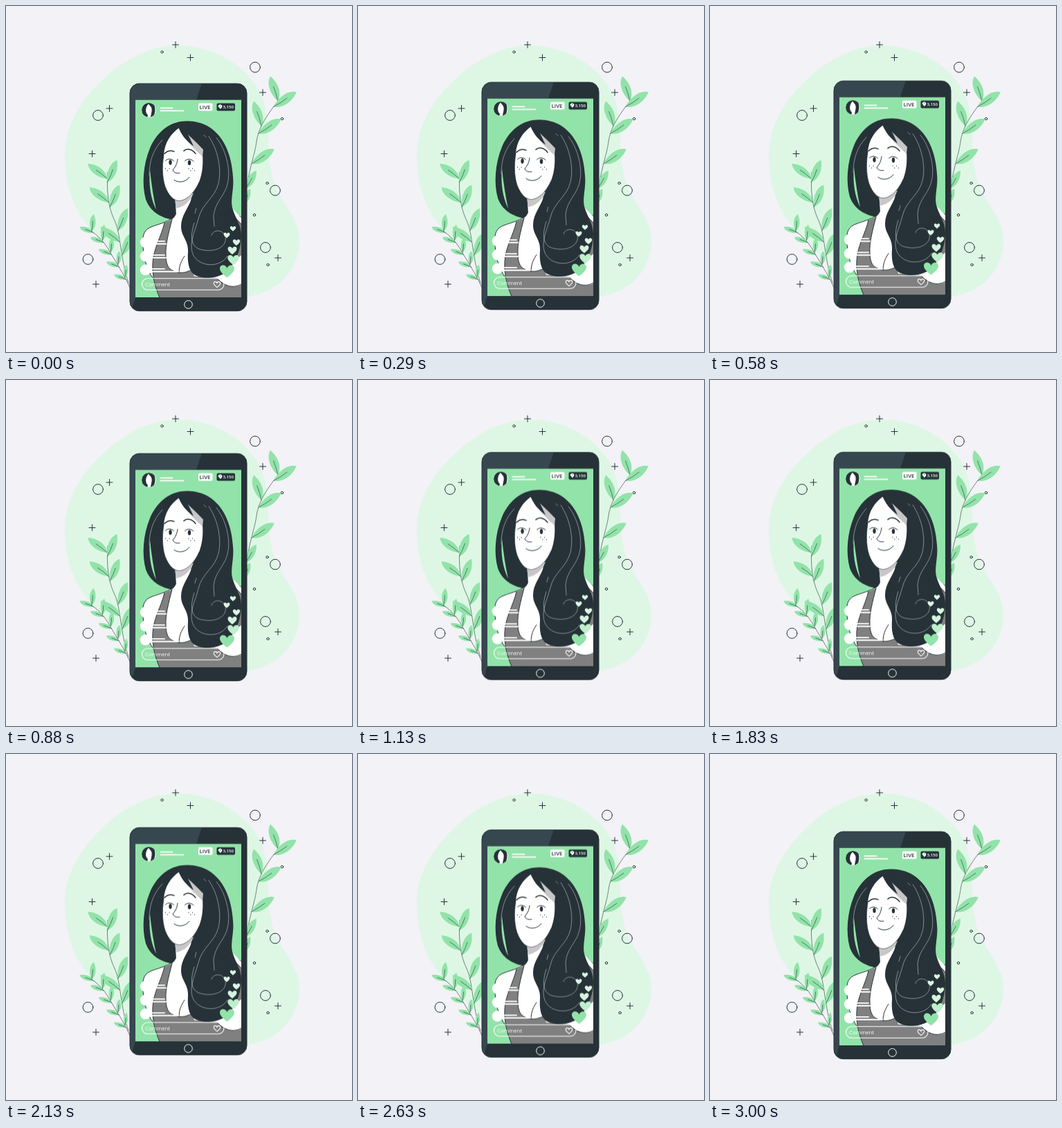
An HTML page for the animation above (3040 ms loop, 500 by 500 pixels).

```html
<!DOCTYPE html>
<html lang="en">
<head>
<meta charset="utf-8">
<title>Live stream</title>
<style>
  html, body { margin: 0; width: 100%; height: 100%; overflow: hidden; background: #f2f2f7; }
  svg { display: block; width: 100vw; height: 100vh; }
  text { font-family: "Open Sans", "Noto Sans", sans-serif; }
  .ink { fill: none; stroke: #263238; stroke-width: 1; stroke-linecap: round; stroke-linejoin: round; }
  .thin { stroke-width: .6; }
  .bold { stroke-width: 1.5; }
  .strand { fill: none; stroke: #b9c0c3; stroke-width: .65; stroke-linecap: round; }
  .line { fill: none; stroke: #fff; stroke-width: 1.9; stroke-linecap: round; }
  .dark { fill: #263238; }
  .green { fill: #92e3a9; }
  .white { fill: #fff; }
  .shade { fill: #c7c7c7; }
  .cloth { fill: #808080; }
  #phone { animation: float 3040ms linear infinite; }
  /* 1.5 s up, 1.5 s down, then a 40 ms rest */
  @keyframes float {
    0%, 98.684%, 100% { transform: translateY(.4px); }
    49.342% { transform: translateY(-9.6px); }
  }
</style>
</head>
<body>
<svg viewBox="0 0 500 500">
  <defs>
    <clipPath id="screen"><rect x="187" y="135" width="153" height="285.5"/></clipPath>
    <clipPath id="body"><rect x="179" y="111.5" width="169" height="329" rx="14"/></clipPath>
    <clipPath id="avatar"><circle cx="206.5" cy="150" r="10.5"/></clipPath>
    <path id="heart" d="M0 .42C-.2 .25-.5 .02-.5-.2C-.5-.5-.12-.52 0-.24C.12-.52 .5-.5 .5-.2C.5 .02 .2 .25 0 .42Z"/>
    <path id="plus" d="M-4.5 0h9M0-4.5v9"/>
    <circle id="ring" r="7.4"/>
    <circle id="bead" r="1.7"/>
  </defs>

  <path fill="#def7e5" d="M250 57C301 58 345 85 366 123C384 160 376 205 383 238C388 280 424 299 424 340C424 382 390 419 338 421C278 424 222 414 187 385C162 365 137 340 117 316C96 290 85 255 85 216C85 178 103 143 134 112C168 78 207 57 250 57Z"/>

  <g class="ink">
    <use href="#plus" x="245" y="56"/>
    <use href="#plus" x="266.500" y="74.500"/>
    <use href="#plus" x="149.500" y="148"/>
    <use href="#plus" x="124.500" y="213.500"/>
    <use href="#plus" x="371" y="125"/>
    <use href="#plus" x="393" y="364"/>
    <use href="#plus" x="130" y="402"/>
    <use href="#ring" x="133" y="158"/>
    <use href="#ring" x="360" y="88.500"/>
    <use href="#ring" x="389" y="266.500"/>
    <use href="#ring" x="375" y="349"/>
    <use href="#ring" x="118.500" y="366"/>
    <use href="#bead" x="225.500" y="66.500"/>
    <use href="#bead" x="399" y="163"/>
    <use href="#bead" x="377.500" y="256"/>
    <use href="#bead" x="359" y="302"/>
    <use href="#bead" x="378.500" y="374"/>
  </g>
  <g id="plants"></g>

  <g id="phone">
    <g clip-path="url(#body)">
      <rect class="dark" x="179" y="111" width="169" height="331"/>
      <path fill="#37474f" d="M179 111H283L275 135H187V420.5L181 441H179Z"/>
    </g>
    <rect class="ink" x="179" y="111.5" width="169" height="329" rx="14"/>
    <circle cx="263.5" cy="431" r="5.8" fill="none" stroke="#fff"/>

    <g clip-path="url(#screen)">
      <rect class="green" x="187" y="135" width="153" height="286"/>

      <!-- shoulders, arm and top -->
      <path class="white" d="M245 276L246 298C244 309 226 313 212 318C200 322 197 330 198 342C198 362 203 380 213 394L222 421H340V395L262 330L268 270Z"/>
      <path class="ink" d="M246 298C244 309 226 313 212 318C200 322 197 330 198 342C198 362 203 380 213 394"/>
      <path class="cloth" d="M229 313L240 308C235 328 230 345 231 360C231 371 234 378 239 381C249 387 260 386 269 380L272 390L340 395V421H222C216 407 211 391 212 371C213 350 224 334 229 313Z"/>
      <path class="ink" d="M229 313C224 334 213 350 212 371C211 391 216 407 222 421M240 308C235 328 230 345 231 360C231 371 234 378 239 381C249 387 260 386 269 380M250 385C250 376 253 368 258 361"/>
      <path class="cloth" d="M328 303H341V366L328 374Z"/>
      <path class="white" d="M328 293L341 307V316L330 304Z"/>
      <path class="white" d="M303 389C312 385 321 376 329 368L341 359V402C332 407 321 406 314 400C309 397 305 394 303 389Z"/>
      <path class="ink" d="M306 394C315 404 329 409 341 401M330 304L341 316"/>

      <!-- hair -->
      <path class="dark" d="M258 166C234 167 217 184 208 205C198 229 196 258 202 279C208 296 223 305 239 308C245 305 246 300 246 292L268 278C264 291 253 302 253 318C253 333 264 338 263 355C262 370 264 386 277 390C292 395 313 392 323 379C334 366 340 348 340 331C340 315 331 306 327 291C324 278 330 263 328 246C326 213 314 187 293 174C283 168 270 165 258 166Z"/>
      <path class="green" d="M208 236C206 258 209 278 217 294C213 276 210 256 208 236Z"/>

      <!-- neck and face -->
      <path class="white" d="M244 272L246 300C254 297 264 288 269 274Z"/>
      <path class="shade" d="M244 275L245.5 292C256 290 265 284 271 270Z"/>
      <path class="white" d="M251 175C238 184 229 197 228 215C225 233 226 253 232 265C237 276 245 282 252 281C263 279 273 268 279 254C284 241 285 228 284 214C274 200 261 188 251 175Z"/>
      <path class="shade" d="M251 175C258 192 269 204 284 217L285 207C274 195 262 184 251 175Z"/>
      <path class="dark" d="M248 172C253 186 261 195 271 202C266 190 260 182 259 172Z"/>
      <path class="ink thin" d="M228 215C225 233 226 253 232 265C237 276 245 282 252 281C263 279 273 268 279 254"/>
      <path class="ink bold" d="M229 213C233 209 238 208 243 210M257 209C261 205 269 206 274 213"/>
      <path class="ink" d="M230.5 223C234 219.5 239 220 242.5 223.5M258.5 223.5C262 220 267 220 271 224M248 221C247 227 246 231 241 236.5C242 240 246 242 251 241M243 251C250 256 260 254 265 247"/>
      <ellipse class="dark" cx="237.5" cy="225.500" rx="2.200" ry="3.600"/>
      <ellipse class="dark" cx="265" cy="226" rx="2.200" ry="3.600"/>
      <g id="freckles" class="dark"></g>

      <path class="strand" d="M226 193C212 208 207 225 207 244"/>
      <path class="strand" d="M293 188C306 207 312 235 307 256C302 277 283 285 278 307C273 326 264 342 270 358C278 377 309 379 320 361"/>
      <path class="strand" d="M304 190C318 207 324 235 321 252C318 274 302 281 300 303L301 318"/>
      <path class="strand" d="M275 292L273 299M272 313C264 338 270 350 284 352C303 356 320 347 317 333C314 322 299 322 297 331M286 186L289 189"/>

      <!-- stream header -->
      <g clip-path="url(#avatar)">
        <circle class="dark" cx="206.5" cy="150" r="10.500"/>
        <path class="white" d="M213 139C217 148 216 156 211 162H219V139ZM206 141C201 146 201 154 205 157L204 161H209C209 156 212 151 210 146Z"/>
      </g>
      <path class="line" d="M223.5 147H240.5M223.5 151H256.5"/>
      <rect class="white" x="278" y="140" width="20.500" height="11" rx="1.500"/>
      <text x="279.600" y="148.300" font-size="7.800" font-weight="600" fill="#263238">LIVE</text>
      <rect class="dark" x="304.500" y="140" width="26.500" height="11" rx="2"/>
      <path class="white" d="M306.5 144C308 141.500 311 141.500 312.500 144C312 147 310 148.500 309 148C309 146 307 146 306.500 144Z"/>
      <circle class="dark" cx="309.500" cy="144.200" r=".7"/>
      <text x="313.500" y="147.600" font-size="6.100" font-weight="600" fill="#fff">3,150</text>

      <!-- comments and reactions -->
      <g id="comments"></g>
      <rect x="196.500" y="393.300" width="118.500" height="16.500" rx="8.250" fill="none" stroke="#fff" stroke-width="1.100"/>
      <text x="201" y="404.300" font-size="7.800" fill="#fff">Comment</text>
      <use href="#heart" transform="translate(305 402.200) scale(9.500)" fill="none" stroke="#fff" stroke-width=".12"/>
      <g id="hearts"></g>
    </g>
  </g>
</svg>
<script>
  const NS = "http://www.w3.org/2000/svg";
  const add = (parent, tag, attrs) => {
    const el = document.createElementNS(NS, tag);
    for (const key in attrs) el.setAttribute(key, attrs[key]);
    return document.getElementById(parent).appendChild(el);
  };
  const stem = d => add("plants", "path", { d, class: "ink thin" });

  function leaf(x, y, dx, dy) {
    const at = (along, side) => `${x + dx * along - dy * side} ${y + dy * along + dx * side}`;
    add("plants", "path", {
      class: "green",
      d: `M${x} ${y}C${at(.2, .2)} ${at(.6, .26)} ${at(1, 0)}C${at(.8, -.22)} ${at(.35, -.22)} ${x} ${y}Z`
    });
    stem(`M${x} ${y}Q${at(.3, .03)} ${at(.58, 0)}`);
  }

  // Leaves on one side share a direction and sit at regular steps down the stem.
  function sprig(d, ...sides) {
    const path = stem(d), length = path.getTotalLength();
    for (const { start, step, count, dx, dy, shrink = 1, power = 1 } of sides)
      for (let i = 0; i < count; i++) {
        const { x, y } = path.getPointAtLength(length * (start + step * i ** power));
        leaf(x, y, dx * shrink ** i, dy * shrink ** i);
      }
  }

  sprig("M147 240C145 268 148 292 157 310C166 329 165 365 177 400",
    { start: .06, step: .21, count: 3, dx: -28, dy: -22, power: 1.45 },
    { start: .09, step: .22, count: 4, dx: 14, dy: -32 });
  sprig("M117 322C135 331 144 344 153 360C163 377 173 392 180 409",
    { start: .1, step: .19, count: 5, dx: -20, dy: -8, shrink: .97 },
    { start: .07, step: .19, count: 5, dx: 3, dy: -25, shrink: .93 });
  sprig("M395 135C378 156 365 175 362 196C359 219 350 234 344 290",
    { start: .02, step: .26, count: 2, dx: -11, dy: -36 },
    { start: .08, step: .27, count: 3, dx: 33, dy: -21 });
  leaf(346, 264, 16, -26);
  leaf(344, 286, 9, -22);

  for (const [x, count] of [[230.5, 3], [264, 4]])
    for (let i = 0; i < count; i++)
      add("freckles", "circle", { cx: x + 2.8 * i, cy: 234.5 + 3 * (i % 2), r: .65 });

  for (let i = 0; i < 3; i++) {
    const y = 341 + 20 * i;
    add("comments", "circle", { cx: 201.5, cy: y, r: 7.8, fill: "#fff" });
    add("comments", "path", { class: "line", d: `M212 ${y - 1.5}H229M212 ${y + 2.3}H${i < 2 ? 231 : 249}` });
  }

  // Hearts grow, spread and deepen in colour towards the bottom.
  [328, 319, 333, 327, 328.5, 319.5].forEach((x, i) => {
    const y = 321.5 + 9.5 * i + .115 * i ** 3, size = 8.5 + .5 * i ** 2;
    add("hearts", "use", {
      href: "#heart",
      transform: `translate(${x} ${y}) scale(${size})`,
      style: `fill: color-mix(in srgb, #92e3a9 ${100 * (i / 5) ** 4}%, #def7e5)`
    });
  });
</script>
</body>
</html>
```
